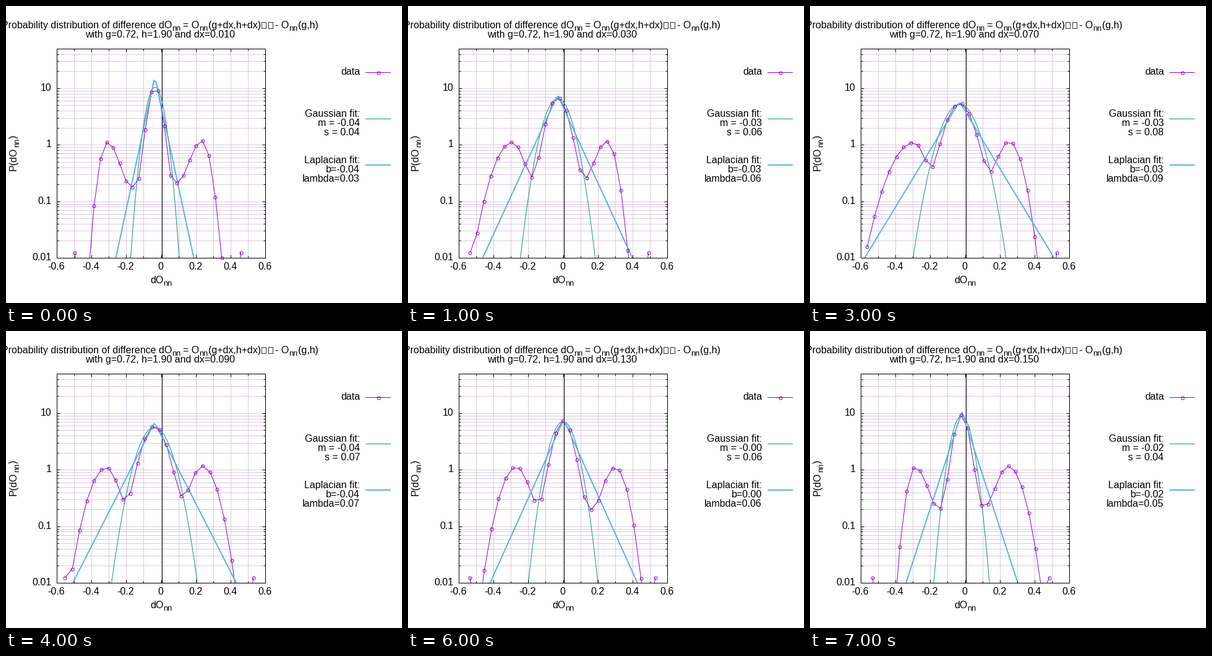
A matplotlib script for the animation above (8 s loop, 640 px wide and 480 px high).

```python
import numpy as np
import matplotlib.pyplot as plt
from matplotlib.animation import FuncAnimation
from matplotlib.patches import Rectangle

W, H, DPI = 640, 480, 100
PX = 72 / DPI
LEFT, RIGHT, TOP, BOTTOM = 82.5, 419.5, 69.5, 407.5
DECADE = (BOTTOM - TOP) / np.log10(5000)
VIOLET, GREEN, BLUE = "#9400d3", "#009e73", "#56b4e9"
GRID, GRID_TEN = "#dcc8e0", "#d2dcd2"
FRAMES, BINS = 8, 27

# Key settings by dx: Gaussian m, s; Laplacian b, lambda; data range;
# left side lobe and right side lobe, each as centre and outer width
KEYS = {
    0.01: (-0.0365, 0.0375, -0.0374, 0.0303, -0.497, 0.458, -0.312, 0.033, 0.237, 0.034),
    0.05: (-0.0267, 0.0819, -0.0292, 0.0995, -0.575, 0.522, -0.279, 0.115, 0.269, 0.045),
    0.09: (-0.0392, 0.0694, -0.0390, 0.0720, -0.554, 0.530, -0.317, 0.068, 0.240, 0.060),
    0.11: (0.0169, 0.0584, 0.0082, 0.0637, -0.543, 0.507, -0.258, 0.054, 0.304, 0.057),
    0.13: (-0.0010, 0.0552, 0.0025, 0.0637, -0.536, 0.529, -0.272, 0.063, 0.300, 0.049),
    0.15: (-0.0214, 0.0434, -0.0196, 0.0461, -0.533, 0.4825, -0.290, 0.034, 0.250, 0.060),
}

plt.rcParams["font.family"] = "Liberation Sans"
fig = plt.figure(figsize=(W / DPI, H / DPI), dpi=DPI, facecolor="white")
ax = fig.add_axes([0, 0, 1, 1])
ax.set_xlim(0, W)
ax.set_ylim(H, 0)
ax.axis("off")


def box(x, y, w, h, width=1):
    return ax.add_patch(Rectangle((x, y), w, h, fill=False, ec="black",
                                  lw=width * PX, snap=False, zorder=6))


def to_x(v):
    return LEFT + (np.asarray(v) + 0.6) / 1.2 * (RIGHT - LEFT)


def to_y(p):
    return BOTTOM - DECADE * (np.log10(p) + 2)


def line(xs, ys, color="black", width=1, z=2):
    return ax.plot(xs, ys, color=color, lw=width * PX, snap=False,
                   solid_capstyle="butt", zorder=z)[0]


def label(x, y, s, ha="left", size=16, rot=0):
    return ax.text(x, y, s, fontsize=size * PX, ha=ha, va="baseline",
                   rotation=rot, rotation_mode="anchor", zorder=8)


def rings(xs, ys):
    return ax.plot(xs, ys, "o", ms=5 * PX, mfc="none", mec=VIOLET,
                   mew=PX, snap=False, zorder=7)[0]


def tick(x, y, dx, dy):
    line([x, x + dx], [y, y + dy], z=6)


def draw_grid():
    for k in range(-6, 7):
        x = np.floor(to_x(k / 10)) + 0.5
        size = 3 if k % 2 else 5
        if abs(k) < 6:
            line([x, x], [TOP, BOTTOM], GRID, z=1)
        tick(x, BOTTOM, 0, -size)
        tick(x, TOP, 0, size)
        if k % 2 == 0:
            label(x - 1.2, 426, f"{k / 10:g}", "center")
    for e in range(-2, 2):
        for n in range(1, 10):
            p = n * 10.0 ** e
            if p >= 50:
                break
            y = np.floor(to_y(p)) + 0.5
            size = 5 if n == 1 else 3
            if p > 0.01:
                line([LEFT, RIGHT], [y, y], GRID_TEN if p == 10 else GRID, z=1)
            tick(LEFT, y, size, 0)
            tick(RIGHT, y, -size, 0)
            if n == 1:
                label(73.7, y + 3.3, f"{p:g}", "right")
    line([252.5, 252.5], [TOP, BOTTOM], z=2.5)


def draw_titles():
    label(-7, 36, "Probability distribution of difference dO")
    label(286.4, 36, "= O")
    label(326.7, 36, "(g+dx,h+dx)")
    label(435, 36, "- O")
    label(471.8, 36, "(g,h)")
    for x in (267.8, 312.6, 457.6):
        label(x, 40.5, "nn", size=12.8)
    for x in (413.5, 424.5):
        box(x, 26.5, 7, 10, 0.8)
    label(233, 448, "dO")
    label(254.3, 452, "nn", size=12.8)
    label(17, 266, "P(dO", rot=90)
    label(21, 228.5, "nn", size=12.8, rot=90)
    label(17, 214.3, ")", rot=90)


def draw_key():
    for y, s in ((111, "data"), (179, "Gaussian fit:"), (254, "Laplacian fit:")):
        label(572, y, s, "right")
    for y, color, width in ((107.5, VIOLET, 1), (182.5, GREEN, 1), (257, BLUE, 2)):
        line([581, 622], [y, y], color, width)
    rings([601.5], [107.5])


def settings(dx):
    columns = zip(*KEYS.values())
    return [np.interp(dx, list(KEYS), column) for column in columns]


def gaussian(v, m, s):
    return np.exp(-((v - m) / s) ** 2 / 2) / (s * np.sqrt(2 * np.pi))


def laplacian(v, b, lam):
    return np.exp(-abs(v - b) / lam) / (2 * lam)


def side_lobe(v, centre, outer, inner=0.05):
    width = np.where((v - centre) * centre > 0, outer, inner)
    return 1.1 * np.exp(-((v - centre) / width) ** 2 / 2)


def histogram(v, m, s, left, left_w, right, right_w):
    """Narrow centre peak, low plateau and two side lobes."""
    p = 0.78 * gaussian(v, m, 0.78 * s) + 0.2 * np.exp(-(v / 0.25) ** 4)
    p += side_lobe(v, left, left_w) + side_lobe(v, right, right_w)
    # the outermost bins hold at least one sample
    p[[0, -1]] = np.maximum(p[[0, -1]], 0.0125)
    return np.maximum(p, 1e-3)


plot_area = box(LEFT, TOP, RIGHT - LEFT, BOTTOM - TOP)
draw_grid()
draw_titles()
draw_key()
data_line = line([], [], VIOLET, z=3)
gauss_line = line([], [], GREEN, z=4)
laplace_line = line([], [], BLUE, 2, z=5)
for curve in (data_line, gauss_line, laplace_line):
    curve.set_clip_path(plot_area)
data_rings = rings([], [])
subtitle = label(249.5, 51, "", "center")
fit_texts = [label(572, y, "", "right") for y in (194, 209, 269, 284)]
samples = np.linspace(-0.6, 0.6, 100)


def draw(i):
    dx = 0.01 + 0.02 * i
    m, s, b, lam, low, high, *lobes = settings(dx)
    v = np.linspace(low, high, BINS)
    xs, ys = to_x(v), to_y(histogram(v, m, s, *lobes))
    seen = ys < BOTTOM
    data_line.set_data(xs, ys)
    data_rings.set_data(xs[seen], ys[seen])
    gauss_line.set_data(to_x(samples), to_y(gaussian(samples, m, s)))
    laplace_line.set_data(to_x(samples), to_y(laplacian(samples, b, lam)))
    subtitle.set_text(f"with g=0.72, h=1.90 and dx={dx:.3f}")
    values = (f"m = {m:.2f}", f"s = {s:.2f}", f"b={b:.2f}", f"lambda={lam:.2f}")
    for text, value in zip(fit_texts, values):
        text.set_text(value)
    return []


anim = FuncAnimation(fig, draw, frames=FRAMES, interval=1000,
                     init_func=lambda: draw(0), repeat=True, repeat_delay=0)
plt.show()
```
